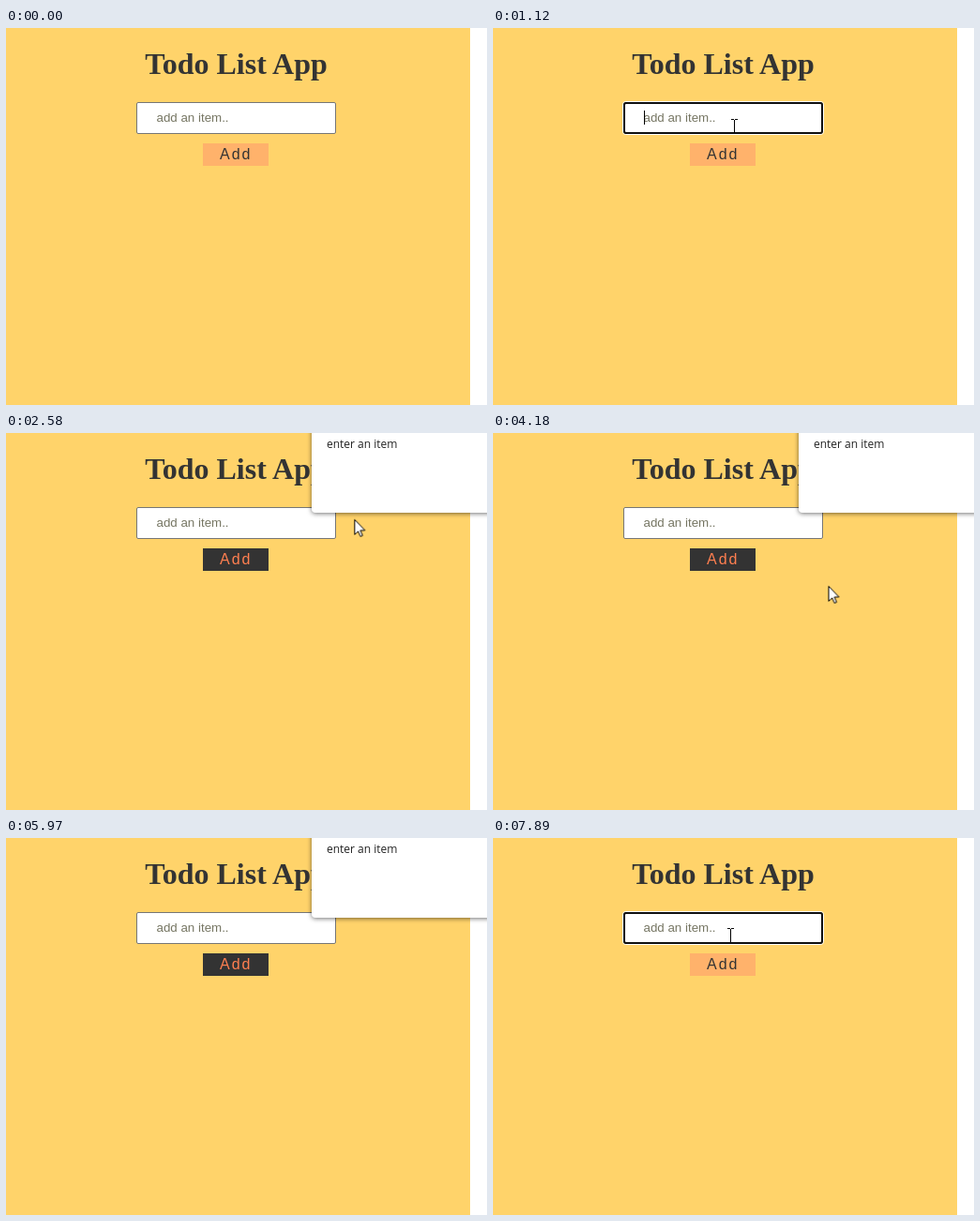
These frames come from a looping animation (513x402 px, 8 s). An HTML page:

```html
<!DOCTYPE html>
<html lang="en">
<head>
<meta charset="utf-8">
<title>Todo list</title>
<style>
  html, body { margin: 0; width: 100%; height: 100%; overflow: hidden; background: #fff; }
  svg { display: block; width: 513px; height: 402px; overflow: hidden; }
  .sans { font-family: "Liberation Sans", Arial, sans-serif; }
  .title { font: bold 32px "Liberation Serif", "Times New Roman", serif; fill: #333; }
  .hint { font-size: 13.333px; fill: #757562; }
  .add { font-size: 16px; letter-spacing: 2px; }
  .alert { filter: drop-shadow(0 1px 2.5px rgba(0, 0, 0, .55)); }
  .message { font: 12px "Open Sans", "Noto Sans", sans-serif; fill: #222; }

  .hover, .cursor { animation: 8s linear infinite; }
  .hover { animation-name: hover; }
  .cursor { animation-name: move; }
  .border, .focus, .caret, .dialog, .arrow, .beam { animation: 8s step-end infinite; }
  .border { animation-name: border; }
  .focus { animation-name: focus; }
  .caret { animation-name: caret; }
  .dialog { animation-name: dialog; }
  .arrow { animation-name: arrow; }
  .beam { animation-name: beam; }

  @keyframes hover {
    0% { opacity: 0; }
    2.625% { opacity: 0; animation-timing-function: ease-out; }
    6% { opacity: .85; animation-timing-function: ease; }
    11.25% { opacity: 0; }
    22.5% { opacity: 0; animation-timing-function: ease; }
    28.75% { opacity: 1; }
    83% { opacity: 1; animation-timing-function: ease; }
    88.5%, 100% { opacity: 0; }
  }
  @keyframes border {
    0%, 12.75%, 92.375%, 100% { stroke: #767676; }
    6.5%, 87% { stroke: #4f4f4f; }
  }
  @keyframes focus {
    0%, 28.125% { opacity: 0; }
    12.75%, 92.375%, 100% { opacity: 1; }
  }
  @keyframes caret {
    0%, 19%, 28.125%, 98.625%, 100% { opacity: 0; }
    12.75%, 25.25%, 92.375% { opacity: 1; }
  }
  @keyframes dialog {
    0%, 83%, 100% { opacity: 0; }
    28.125% { opacity: 1; }
  }
  @keyframes arrow {
    0%, 20%, 100% { opacity: 1; }
    6.3%, 87% { opacity: 0; }
  }
  @keyframes beam {
    0%, 20% { opacity: 0; }
    6.3%, 87%, 100% { opacity: 1; }
  }
  @keyframes move {
    0%, .86% { transform: translate(600px, 500px); }
    .87% { transform: translate(437px, 391px); animation-timing-function: ease-out; }
    2.625% { transform: translate(268px, 144px); }
    6% { transform: translate(259px, 116px); }
    6.6%, 19% { transform: translate(257px, 104px); }
    20.5% { transform: translate(259px, 122px); }
    21.75% { transform: translate(264px, 157px); }
    23.75%, 29.75% { transform: translate(264px, 142px); }
    32.25% { transform: translate(371px, 92px); }
    35.6% { transform: translate(470px, 30px); }
    38.1%, 45.6% { transform: translate(514px, 5px); }
    45.62%, 46.25% { transform: translate(481px, 10px); }
    46.37%, 48.8% { transform: translate(505px, -8px); }
    50.6% { transform: translate(430px, 110px); }
    51.6% { transform: translate(374px, 166px); }
    52.25% { transform: translate(358px, 163px); animation-timing-function: ease-out; }
    56.375%, 59.6% { transform: translate(258px, 130px); }
    60.6% { transform: translate(240px, 131px); animation-timing-function: ease-in-out; }
    65% { transform: translate(485px, 63px); animation-timing-function: ease-in-out; }
    69.6%, 71.2% { transform: translate(240px, 131px); }
    73.9% { transform: translate(386px, 92px); }
    74.5% { transform: translate(386px, 92px); }
    74.6%, 83% { transform: translate(514px, 30px); }
    85% { transform: translate(400px, 72px); animation-timing-function: ease-out; }
    87.9%, 90.4% { transform: translate(258px, 106px); }
    92.5%, 100% { transform: translate(253px, 103px); }
  }
</style>
</head>
<body>
<svg viewBox="0 0 513 402">
  <rect width="495" height="402" fill="#ffd36a"/>
  <text class="title" x="245.5" y="49" text-anchor="middle">Todo List App</text>

  <rect class="border" x="139.5" y="79.5" width="212" height="33" rx="1.5" fill="#fff" stroke="#767676"/>
  <g class="focus" fill="none">
    <rect x="138.5" y="78.5" width="214" height="35" rx="3" stroke="#fff"/>
    <rect x="140" y="80" width="211" height="32" rx="2" stroke="#101010" stroke-width="2"/>
  </g>
  <text class="sans hint" x="160.5" y="100">add an item..</text>
  <rect class="caret" x="161" y="88" width="1" height="15"/>

  <g class="sans add">
    <rect x="210" y="123" width="70" height="24" fill="#ffb26b"/>
    <text x="228" y="140" fill="#333">Add</text>
    <g class="hover">
      <rect x="210" y="123" width="70" height="24" fill="#333"/>
      <text x="228" y="140" fill="#ff7f50">Add</text>
    </g>
  </g>

  <g class="dialog">
    <rect class="alert" x="326" y="-20" width="220" height="105" rx="4" fill="#fff"/>
    <text class="message" x="342" y="16">enter an item</text>
  </g>

  <g class="cursor">
    <path class="arrow" d="M.5 .5V16.5L4.2 13L6.7 18.5L9 17.5L6.6 12H11.5Z" fill="#fff" stroke="#000"/>
    <path class="beam" d="M-3 -6.5H0M1 -6.5H4M.5 -6V8" fill="none" stroke="#000"/>
  </g>
</svg>
</body>
</html>
```
